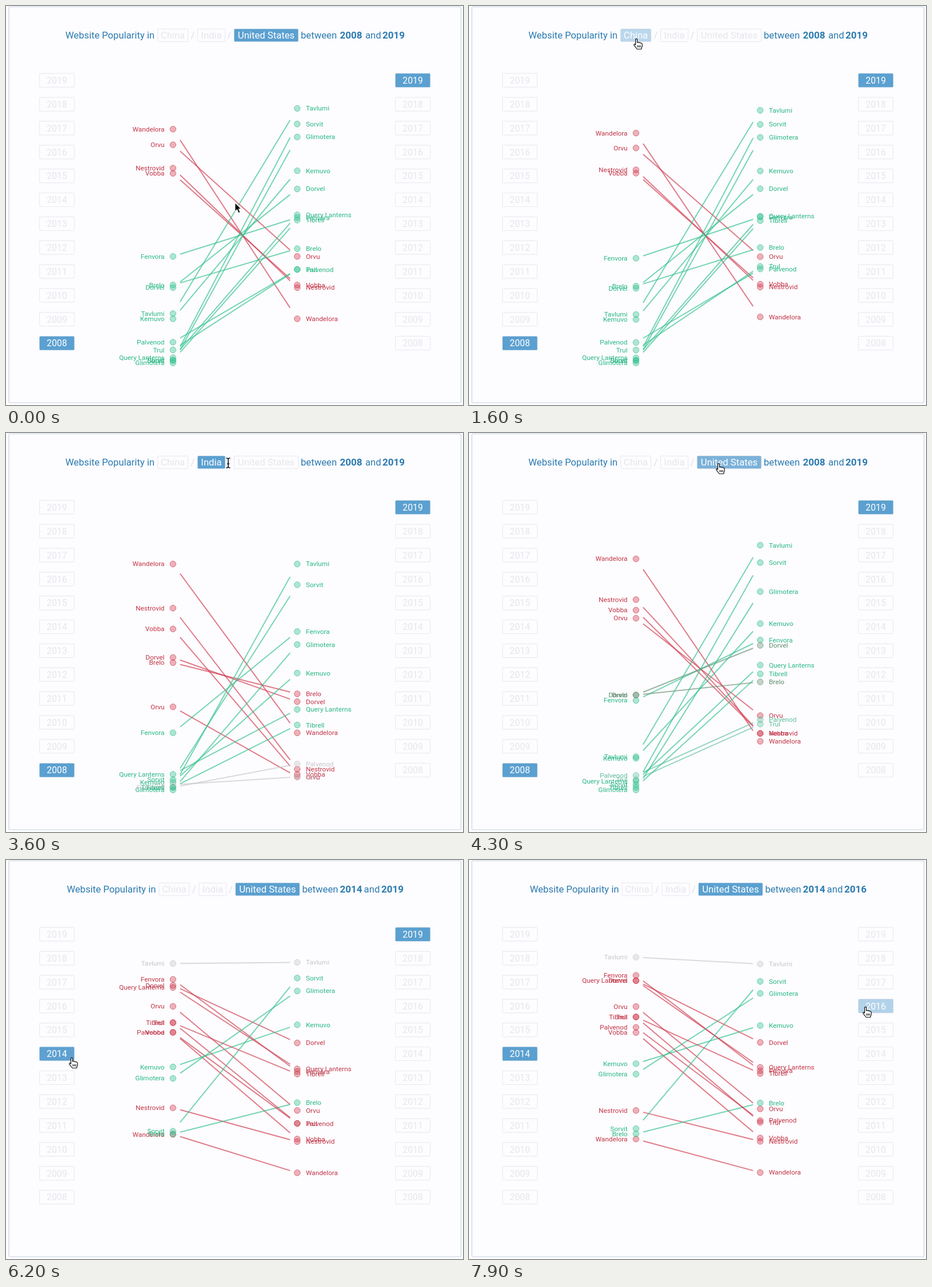
These frames come from a looping animation (800 px wide and 699 px high, 8000 ms). An HTML page:

```html
<!DOCTYPE html>
<html lang="en">
<head>
<meta charset="utf-8">
<title>Website Popularity</title>
<style>
  html, body { margin: 0; width: 100%; height: 100%; overflow: hidden; background: #fdfdfe; }
  svg { display: block; width: 800px; height: 699px; font-family: Roboto, "Open Sans", sans-serif; }
  .title { font-size: 16.7px; fill: #2b7bb0; }
  .title .year { font-weight: 700; font-size: 17px; text-anchor: middle; }
  .title .slash { fill: #dedee6; text-anchor: middle; }
  .button .box { fill: none; stroke: #ebebf1; stroke-width: 1.2; }
  .button .glow { fill: #5ba0d0; }
  .button text { text-anchor: middle; }
  .years { font-size: 15.8px; }
  .site { font-size: 11.8px; }
  .site .start { text-anchor: end; }
  .site line { stroke-width: 2; stroke-opacity: .65; }
  .site circle { fill-opacity: .38; stroke-opacity: .65; }
  .cursor { fill: #fff; stroke: #111; stroke-width: 1.2; stroke-linejoin: round; }
</style>
</head>
<body>
<svg viewBox="0 0 800 699">
  <rect x="5" y="1.5" width="791.5" height="693.5" rx="1.5" fill="#fdfcfe" stroke="#c6d4e3" stroke-width="1.2"/>
  <g class="title">
    <g id="lead">
      <text x="104" y="57">Website Popularity in</text>
      <text class="slash" x="327" y="57">/</text>
      <text class="slash" x="391" y="57">/</text>
      <g id="countries"></g>
      <text x="516" y="57">between</text>
    </g>
    <text class="year" id="from" x="604" y="57"></text>
    <text id="and" x="629" y="57">and</text>
    <text class="year" id="to" x="678.5" y="57"></text>
  </g>
  <g class="years" id="years"></g>
  <g id="lines" class="site"></g>
  <g id="marks" class="site"></g>
  <circle id="press" r="33.5" fill="none" stroke="#111" stroke-width="1.8"/>
  <g class="cursor" id="arrow">
    <path d="M0 0V14.5L3.5 11.5L6 17.5L8.8 16.3L6.2 10.5H10.5Z" fill="#000" stroke="#fff" stroke-width=".9"/>
  </g>
  <g class="cursor" id="hand">
    <path d="M-1.4 1.4Q0-.6 1.5 1.4V7Q3 5.8 4.4 7.2Q6 6.5 7.2 8Q9.6 7.6 10.2 9.6V13L8.6 18.5H1.2L-4 11.8Q-4.6 9.6-2.6 9.6L-1.4 11Z"/>
    <path d="M2.2 12V15.5M4.6 12V15.5M7 12V15.5" fill="none"/>
  </g>
  <g class="cursor" id="beam">
    <path d="M-3.5-8Q0-8 0-6Q0-8 3.5-8M0-6V7M-3.5 9Q0 9 0 7Q0 9 3.5 9M-2 2H2" fill="none" stroke="#fff" stroke-width="3"/>
    <path d="M-3.5-8Q0-8 0-6Q0-8 3.5-8M0-6V7M-3.5 9Q0 9 0 7Q0 9 3.5 9M-2 2H2" fill="none" stroke-width="1.6"/>
  </g>
</svg>
<script>
const LOOP = 8000, MORPH = 800;
const LEFT = 292.3, RIGHT = 509.8, GAP = 12.5;
const GREEN = [46, 192, 140], RED = [208, 56, 76], GREY = [200, 198, 203];
const GREEN_TEXT = [40, 184, 132], RED_TEXT = [194, 52, 70];

const sites = ["Wandelora", "Orvu", "Nestrovid", "Vobba", "Fenvora", "Brelo", "Dorvel", "Tavlumi",
  "Kemuvo", "Palvenod", "Trul", "Query Lanterns", "Sorvit", "Glimotera", "Tibrell"];

// Rank of every site, 0 at the top and 100 at the bottom.
const ranks = {
  us2008: [10, 16, 25, 27, 59, 70, 71, 81, 83, 92, 95, 98, 99, 100, 99],
  us2019: [83, 59, 71, 70, 44, 56, 33, 2, 26, 64, 64, 43, 8, 13, 45],
  cn2008: [91, 83, 60, 23, 96, 93, 85, 100, 96, 98, 97, 100, 100, 100, 100],
  cn2019: [44, 64, 60, 53, 33, 32, 29, 42, 31, 54, 0, 70, 17, 21, 56],
  in2008: [13, 68, 30, 38, 78, 51, 49, 99, 97, 99, 98, 94, 96, 100, 99],
  in2019: [78, 95, 92, 94, 39, 63, 66, 13, 55, 90, 95, 69, 21, 44, 75],
  us2014: [70, 19, 59, 29, 7, 68, 9, 0, 41, 27, 23, 9, 66, 45, 23],
  us2016: [82, 53, 70, 66, 41, 57, 31, 8, 29, 53, 60, 37, 21, 22, 43]
};

// Each click selects one country and two years.
const clicks = [
  [-2000, "us", 2008, 2019], [1468, "cn", 2008, 2019], [2770, "in", 2008, 2019],
  [3854, "us", 2008, 2019], [5557, "us", 2014, 2019], [7666, "us", 2014, 2016]
].map(([at, country, from, to]) => ({ at, country, from, to, a: ranks[country + from], b: ranks[country + to] }));

// Pointer stops: time, x, y.
const stops = [[0, 401, 345], [350, 401, 345], [1200, 293, 57], [1900, 293, 57], [2400, 378, 54],
  [3300, 378, 54], [3600, 389, 52], [3800, 437, 53], [4500, 437, 53], [5450, 115, 346],
  [7080, 115, 346], [7600, 694, 257], [LOOP, 694, 257]];

const $ = id => document.getElementById(id);
const mix = (a, b, p) => a + (b - a) * p;
const blend = (a, b, p) => `rgb(${a.map((v, i) => Math.round(mix(v, b[i], p)))})`;
const ease = t => t < .5 ? 4 * t ** 3 : 1 - 4 * (1 - t) ** 3;
const rankY = k => 170.3 + 4.55 * k;

function add(parent, tag, attrs = {}, text = "") {
  const el = document.createElementNS("http://www.w3.org/2000/svg", tag);
  set(el, attrs);
  el.textContent = text;
  return parent.appendChild(el);
}

function set(el, attrs) {
  for (const key in attrs) el.setAttribute(key, attrs[key]);
}

const buttons = [];

function addButton(parent, label, x, y, width, height, isOn) {
  const g = add(parent, "g", { class: "button" });
  const box = { x, y, width, height, rx: 1.5 };
  add(g, "rect", { ...box, class: "box" });
  const glow = add(g, "rect", { ...box, class: "glow" });
  const text = add(g, "text", { x: x + width / 2, y: y + height / 2 + 5.8 }, label);
  buttons.push({ ...box, glow, text, isOn });
}

[["China", "cn", 265.5, 53], ["India", "in", 335.5, 48], ["United States", "us", 399.5, 112]]
  .forEach(([label, code, x, w]) => addButton($("countries"), label, x, 40.3, w, 22, s => s.country === code));

for (let year = 2008; year <= 2019; year++) {
  const y = 118.2 + (2019 - year) * 41.86;
  addButton($("years"), year, 58.7, y, 60.8, 24, s => s.from === year);
  addButton($("years"), year, 681.7, y, 60.8, 24, s => s.to === year);
}

const rows = sites.map(name => ({
  line: add($("lines"), "line", { x1: LEFT + GAP, x2: RIGHT - GAP }),
  dots: [LEFT, RIGHT].map(cx => add($("marks"), "circle", { cx, r: 5.2 })),
  labels: [
    add($("marks"), "text", { x: 277.5, class: "start" }, name),
    add($("marks"), "text", { x: 525 }, name)
  ]
}));

function tint(state, i, up, down) {
  const drop = state.b[i] - state.a[i];
  return Math.abs(drop) < 10 ? GREY : drop < 0 ? up : down;
}

function drawChart(prev, next, p) {
  rows.forEach((row, i) => {
    const ends = ["a", "b"].map(side => rankY(mix(prev[side][i], next[side][i], p)));
    const color = blend(tint(prev, i, GREEN, RED), tint(next, i, GREEN, RED), p);
    const ink = blend(tint(prev, i, GREEN_TEXT, RED_TEXT), tint(next, i, GREEN_TEXT, RED_TEXT), p);
    const inset = (ends[1] - ends[0]) * GAP / (RIGHT - LEFT);
    set(row.line, { y1: ends[0] + inset, y2: ends[1] - inset, stroke: color });
    ends.forEach((y, side) => {
      set(row.dots[side], { cy: y, fill: color, stroke: color });
      set(row.labels[side], { y: y + 4, fill: ink });
    });
  });
}

function drawTitle(state) {
  const shift = state.from === 2014 ? 2.4 : 0;
  set($("lead"), { transform: `translate(${shift} 0)` });
  set($("and"), { x: 629 - shift });
  set($("to"), { x: 678.5 - shift * .8 });
  $("from").textContent = state.from;
  $("to").textContent = state.to;
}

function pointerAt(t) {
  const i = stops.findIndex(s => s[0] > t);
  const [t0, x0, y0] = stops[i - 1], [t1, x1, y1] = stops[i];
  const p = ease((t - t0) / (t1 - t0));
  return [mix(x0, x1, p), mix(y0, y1, p)];
}

function drawButtons(prev, state, p, x, y) {
  let over = false;
  for (const b of buttons) {
    const hover = x >= b.x && x <= b.x + b.width && y >= b.y && y <= b.y + b.height;
    over = over || hover;
    const on = b.isOn(state);
    const level = on ? (b.isOn(prev) ? 1 : mix(.4, 1, p)) : hover ? .4 : 0;
    set(b.glow, { opacity: level });
    set(b.text, { fill: on ? "#fff" : hover ? "#e9f0f7" : "#e6e6ec" });
  }
  return over;
}

function drawPointer(t, x, y, over) {
  const inTitle = y > 40 && y < 63 && x > 104 && x < 697;
  const shape = over ? "hand" : inTitle ? "beam" : "arrow";
  for (const id of ["arrow", "hand", "beam"])
    set($(id), { transform: `translate(${x} ${y})`, visibility: id === shape ? "visible" : "hidden" });
  const pressed = clicks.some(c => t > c.at - 130 && t < c.at + 90);
  set($("press"), { cx: x, cy: y - .5, visibility: pressed ? "visible" : "hidden" });
}

function draw(t) {
  const n = clicks.findLastIndex(c => c.at <= t);
  const next = clicks[n], prev = clicks[Math.max(0, n - 1)];
  const p = ease(Math.min(1, (t - next.at) / MORPH));
  const [x, y] = pointerAt(t);
  drawChart(prev, next, p);
  drawTitle(next);
  drawPointer(t, x, y, drawButtons(prev, next, p, x, y));
}

const begin = performance.now();
function tick() {
  draw((performance.now() - begin) % LOOP);
  requestAnimationFrame(tick);
}
tick();
</script>
</body>
</html>
```
